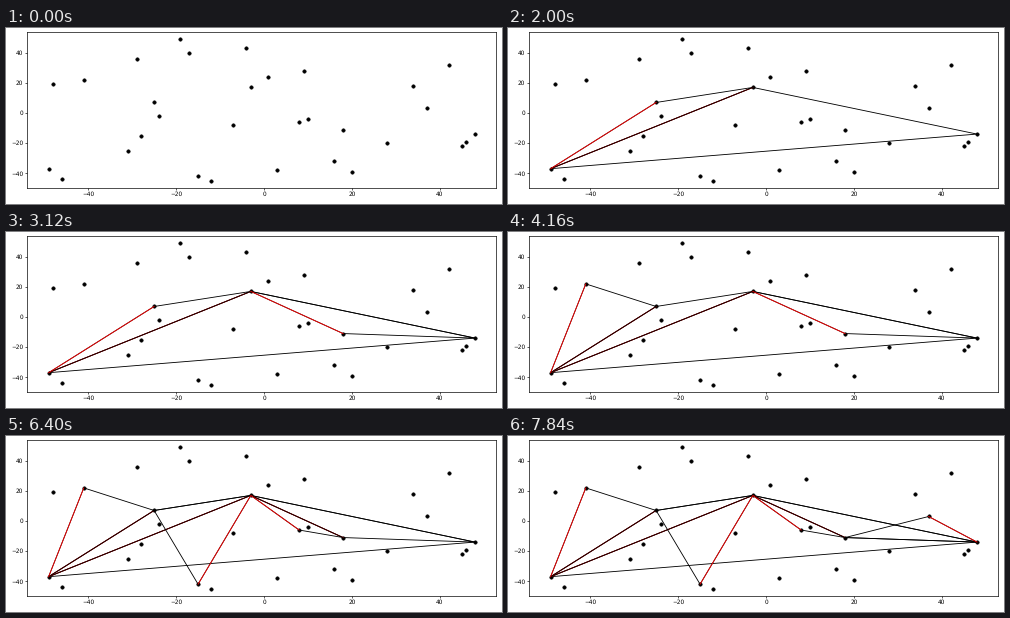
Recreate the animation shown at these times as a matplotlib script. Size 496 by 176 pixels, loop 8000 ms.

```python
import matplotlib.pyplot as plt
from matplotlib.animation import FuncAnimation

WIDTH, HEIGHT, DPI = 496, 176, 41
INTERVAL, FRAMES = 80, 100

plt.rcParams.update({
    "font.family": "DejaVu Sans",
    "font.size": 10,
    "text.hinting": "none",
    "axes.linewidth": 1.2,
    "xtick.major.width": 1.1,
    "ytick.major.width": 1.1,
})

POINTS = [
    (-49, -37), (-48, 19), (-46, -44), (-41, 22), (-31, -25), (-29, 36),
    (-28, -15), (-25, 7), (-24, -2), (-19, 49), (-17, 40), (-15, -42),
    (-12, -45), (-7, -8), (-4, 43), (-3, 17), (1, 24), (3, -38), (8, -6),
    (9, 28), (10, -4), (16, -32), (18, -11), (20, -39), (28, -20), (34, 18),
    (37, 3), (42, 32), (45, -22), (46, -19), (48, -14),
]

# Start time in ms and three corners; the edge from first to second is red.
LEFT, RIGHT, TOP = (-49, -37), (48, -14), (-3, 17)
MID_LEFT, MID_RIGHT = (-25, 7), (18, -11)
TRIANGLES = [
    (960, LEFT, TOP, RIGHT),
    (2000, LEFT, MID_LEFT, TOP),
    (3120, TOP, MID_RIGHT, RIGHT),
    (4160, LEFT, (-41, 22), MID_LEFT),
    (5200, TOP, (-15, -42), MID_LEFT),
    (6240, TOP, (8, -6), MID_RIGHT),
    (7440, RIGHT, (37, 3), MID_RIGHT),
]

fig = plt.figure(figsize=(WIDTH / DPI, HEIGHT / DPI), dpi=DPI, facecolor="white")
left, right, top, bottom = 21.3, 490.3, 4.2, 159.8
ax = fig.add_axes([left / WIDTH, 1 - bottom / HEIGHT,
                   (right - left) / WIDTH, (bottom - top) / HEIGHT])
ax.set(xlim=(-53.85, 52.85), ylim=(-49.7, 53.7),
       xticks=range(-40, 41, 20), yticks=range(-40, 41, 20))
ax.plot(*zip(*POINTS), "ko", markersize=6)


def draw_path(corners, color):
    return ax.plot(*zip(*corners), color=color, lw=1.5)[0]


steps = []
for start, a, b, c in TRIANGLES:
    steps.append((start, draw_path([a, b, c, a], "black")))
    steps.append((start, draw_path([a, b], "red")))


def update(frame):
    now = frame * INTERVAL
    for start, line in steps:
        line.set_visible(now >= start)
    return [line for _, line in steps]


anim = FuncAnimation(fig, update, frames=FRAMES, interval=INTERVAL,
                     repeat=True, repeat_delay=0, blit=False)
plt.show()
```
